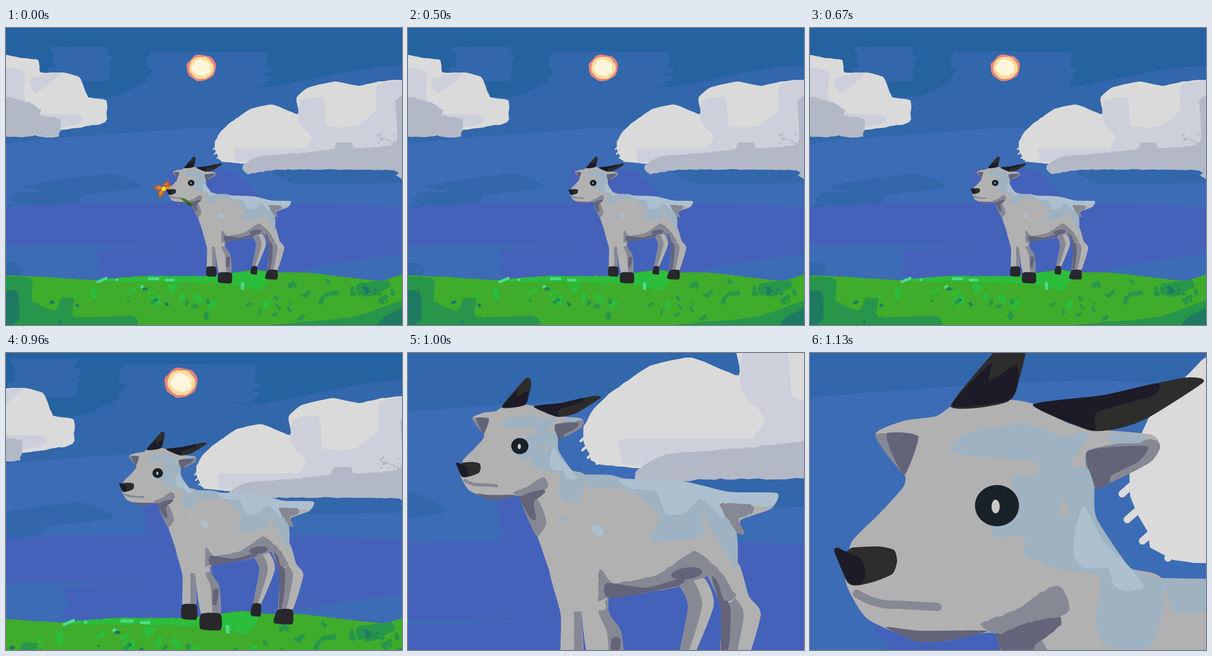
Recreate the animation shown at these times as an HTML page. Size 864 px wide and 648 px high, loop 1710 ms.

```html
<!DOCTYPE html>
<html lang="en">
<head>
<meta charset="utf-8">
<title>Goat</title>
<style>
html, body { margin: 0; width: 100%; height: 100%; overflow: hidden; background: #2562a0; }
svg { display: block; width: 100vw; height: 100vh; }
</style>
</head>
<body>
<svg id="stage" viewBox="0 0 864 648" preserveAspectRatio="none"></svg>
<script>
const NS = 'http://www.w3.org/2000/svg';
const LOOP = 1710;
const C = {
  skyTop: '#2562a0', sky: '#3267ab', skyLow: '#3c6cb5', violet: '#4562ba',
  white: '#dadada', mist: '#cdcfda', cloudShade: '#b3b8c7',
  grass: '#3fac2c', bright: '#2bbd3c', leaf: '#27964a', teal: '#1f7a62', mint: '#4bdb8a',
  coat: '#b1b1b1', shade: '#868893', dark: '#63647a', blue: '#9fb2c1', pale: '#adc0d0',
  black: '#2d2d2c', ink: '#1c1b27', hoof: '#28282c'
};

// Each shot pins the goat's eye and the cloud's left tip to the screen.
const shots = [
  { at: 0, eye: [404, 338], zoom: 1, cloud: [451, 265], depth: 1 },
  { at: 960, eye: [331, 262], zoom: 1.566, cloud: [410, 266], depth: 1.13 },
  { at: 1000, eye: [244, 203], zoom: 2.59, cloud: [374, 193], depth: 1.87 },
  { at: 1040, eye: [330, 337], zoom: 4.02, cloud: [580, 320], depth: 3.46 },
  { at: 1130, eye: [408, 333], zoom: 6.62, cloud: [673, 310], depth: 5.3 }
];
const [wide, near, closer, , face] = shots;
const pin = (from, to, scale) => `translate(${to}) scale(${scale}) translate(${from.map(v => -v)})`;
// Lets a part be drawn in the coordinates of a closer shot.
const drawnIn = shot => pin(shot.eye, wide.eye, 1 / shot.zoom);

let seed = 11;
const random = () => (seed = seed * 16807 % 2147483647) / 2147483647;
const between = (a, b) => a + (b - a) * random();
const jitter = r => between(-r, r);

function add(parent, tag, attrs) {
  const el = document.createElementNS(NS, tag);
  for (const key in attrs) el.setAttribute(key, attrs[key]);
  return parent.appendChild(el);
}
const layer = (parent, transform = '') => add(parent, 'g', { transform });
const points = text => text.split(' ').map(s => s.split(',').map(Number));
const spot = (g, fill, cx, cy, rx, ry, turn = 0) =>
  add(g, 'ellipse', { cx, cy, rx, ry, fill, transform: `rotate(${turn} ${cx} ${cy})` });
const stroke = (g, color, width, d, cap = 'round') =>
  add(g, 'path', { d, stroke: color, 'stroke-width': width, fill: 'none', 'stroke-linecap': cap });

// Closed curve through key points; a rough edge is frayed like dry paint.
function shape(g, fill, keys, rough = 0) {
  const p = typeof keys === 'string' ? points(keys) : keys;
  const at = i => p[(i + p.length) % p.length];
  const edge = [];
  p.forEach((a, i) => {
    const b = at(i + 1), before = at(i - 1), after = at(i + 2);
    const steps = Math.ceil(Math.hypot(b[0] - a[0], b[1] - a[1]) / 9);
    for (let s = 0; s < steps; s++) {
      const t = s / steps, u = 1 - t;
      edge.push(a.map((v, k) => {
        const c1 = v + (b[k] - before[k]) * 0.1;
        const c2 = b[k] - (after[k] - v) * 0.1;
        return u ** 3 * v + 3 * u * u * t * c1 + 3 * u * t * t * c2 + t ** 3 * b[k] + jitter(rough);
      }));
    }
  });
  return add(g, 'path', { d: `M${edge.join('L')}Z`, fill });
}

// Block of horizontal brush strokes with uneven ends.
function wash(g, color, x0, y0, x1, y1, ragged = 16) {
  const height = 9;
  for (let y = y0; y < y1; y += height) {
    const left = x0 + between(0, ragged), right = x1 - between(0, ragged);
    stroke(g, color, height + 3, `M${left} ${y + 5}L${right} ${y + 5 + jitter(1)}`);
  }
}

function disc(g, fill, cx, cy, r, rough) {
  const rim = Array.from({ length: 20 }, (_, i) => {
    const a = i * Math.PI / 10, reach = r + jitter(rough);
    return [cx + reach * Math.cos(a), cy + reach * 0.93 * Math.sin(a)];
  });
  shape(g, fill, rim);
}

function daubs(g, color, count, x0, y0, x1, y1, size) {
  for (let i = 0; i < count; i++) {
    const x = between(x0, x1), y = between(y0, y1);
    stroke(g, color, between(0.5, 1) * size, `M${x} ${y}l${jitter(size)} ${between(0, size)}`);
  }
}

function paintSky(g) {
  add(g, 'rect', { width: 864, height: 648, fill: C.skyTop });
  shape(g, C.sky, '-20,150 225,151 330,112 570,128 884,90 884,420 -20,420');
  wash(g, C.sky, 308, 52, 574, 124);
  wash(g, C.sky, 96, 42, 228, 110);
  shape(g, C.skyLow, '-20,262 200,234 283,228 470,220 560,300 640,341 884,341 884,420 -20,420');
  shape(g, C.sky, '40,345 228,318 294,347 150,364');
  wash(g, C.sky, 0, 360, 160, 392, 30);
  shape(g, C.violet, '-20,394 884,394 884,560 -20,560');
  shape(g, C.skyLow, '-20,474 375,474 200,481 -20,486');
  wash(g, C.skyLow, -20, 476, 205, 545);
  wash(g, C.sky, -20, 513, 32, 540);
  shape(g, C.skyLow, '884,492 640,530 884,550');
  shape(g, C.violet, '353,316 372,309 490,311 550,365 550,396 372,396 360,370', 3);
}

function paintSun(g) {
  disc(g, '#e8837c', 426.5, 87, 31.5, 2);
  disc(g, '#fddc9b', 426.5, 87, 26.5, 1);
  disc(g, '#fff6dc', 426, 87, 20, 3);
}

function paintClouds(g) {
  shape(g, C.white, '-10,66 30,65 70,70 75,97 120,97 160,107 180,150 218,158 220,185 205,210 -10,225', 1);
  shape(g, C.mist, '-10,94 40,96 40,155 80,186 158,189 156,210 -10,225', 1);
  shape(g, C.mist, '52,112 122,97 66,142', 1);
  shape(g, C.cloudShade, '-10,153 48,162 78,180 75,191 118,199 115,236 70,236 -10,232', 2);

  shape(g, C.white, '456,248 468,227 485,210 503,197 533,177 582,167 637,188 634,152 660,130 720,117 770,126 820,116 884,124 884,300 600,300 474,292 463,280 456,265', 0.5);
  for (let i = 0; i < 4; i++) {
    stroke(g, C.white, 3, `M${452.5 + 2.1 * i * i} ${264.5 + 11.5 * i - 0.9 * i * i}l9 -8`);
  }
  wash(g, C.mist, 502, 263, 884, 288, 10);
  shape(g, C.mist, '642,160 692,152 700,212 760,215 806,180 812,124 884,122 884,268 660,268 668,240 640,205', 1.5);
  shape(g, C.cloudShade, '516,301 553,280 640,273 715,263 720,250 755,250 760,262 850,250 850,160 884,152 884,325 850,322 848,310 600,309 528,318', 1);
  daubs(g, C.cloudShade, 14, 810, 230, 848, 252, 4);
}

function paintGround(g) {
  shape(g, C.grass, '-20,547 60,542 200,550 300,541 440,541 540,528 590,533 660,534 815,551 884,538 884,660 -20,660');
  shape(g, C.bright, '200,551 300,542 440,541 540,529 576,540 552,572 500,560 350,554', 2);
  daubs(g, C.bright, 12, 140, 556, 580, 600, 14);
  shape(g, C.leaf, '-20,548 56,548 56,592 106,618 120,589 148,591 150,630 276,628 270,660 -20,660', 2);
  shape(g, C.leaf, '575,650 760,630 884,590 884,660', 1);
  shape(g, C.teal, '-20,578 26,576 28,635 -20,660', 2);
  shape(g, C.teal, '808,655 828,630 884,604 884,655', 1);
  shape(g, C.leaf, '765,560 834,550 838,566 800,584 770,582', 2);
  daubs(g, C.teal, 5, 780, 560, 810, 576, 9);
  daubs(g, C.leaf, 14, 600, 548, 864, 605, 11);
  daubs(g, C.leaf, 16, 270, 575, 680, 632, 9);
  daubs(g, C.teal, 7, 100, 565, 390, 640, 7);
  stroke(g, C.mint, 6, 'M198 555l23-10M239 549h6M310 547h24M347 550h20M294 567l6-5M513 562h7', 'butt');
  stroke(g, C.mint, 7, 'M516 555v16', 'butt');
}

function paintFlower(g) {
  const [x, y] = [343, 351];
  for (const turn of [115, 190, 305, 340]) {
    const petal = layer(g, `translate(${x} ${y}) rotate(${turn})`);
    spot(petal, '#b9592a', 11, 0, 9, 6);
    spot(petal, '#db853a', 10, 1, 6, 3.5);
  }
  spot(g, '#f3d820', 344, 351, 5, 5);
}

function paintStem(g) {
  shape(g, '#4a7a36', '380,372 388,371 410,385 405,390');
  shape(g, '#2f5828', '390,377 407,386 401,389');
}

// A limb is a chain of [x, y, width]; from and to pick a slice of its width.
function limb(g, fill, joints, from = -0.5, to = 0.5) {
  const side = k => joints.map(([x, y, w]) => [x + w * k, y]);
  shape(g, fill, [...side(from), ...side(to).reverse()]);
}

function paintLeg(g, joints, lit, hoofHeight) {
  const [x, y, w] = joints[joints.length - 1];
  limb(g, C.coat, joints);
  if (lit === 'left') limb(g, C.shade, joints, 0.12, 0.5);
  else limb(g, C.shade, joints, -0.5, 0.05);
  const foot = y + hoofHeight, half = w * 0.52;
  const heel = lit === 'left' ? half * 1.1 : half * 1.6;
  shape(g, C.hoof, [[x - half, y - 3], [x + half, y - 3], [x + half * 1.15, foot - 8], [x + half, foot], [x - heel, foot - 3]]);
}

function paintLegs(g) {
  paintLeg(g, points('395,420,50 399,485,28 400,552,29'), 'left', 30);
  paintLeg(g, points('556,436,36 570,472,34 547,550,16'), 'right', 25);
  paintLeg(g, points('420,415,52 430,480,36 440,508,50 447,572,40'), 'left', 33);
  paintLeg(g, points('596,415,44 612,460,42 624,484,50 609,563,30'), 'right', 29);
  limb(g, C.dark, points('588,434,8 602,475,13 602,520,11 598,558,6'));
  limb(g, C.dark, points('458,516,12 455,550,8'));
}

function paintBody(g) {
  shape(g, C.coat, '310,190 340,240 372,264 440,266 480,275 600,280 700,303 806,306 792,340 725,365 733,396 718,390 716,450 728,512 700,545 665,486 580,512 435,536 430,560 340,560 310,480 265,350 245,310');
  shape(g, C.blue, '330,250 372,264 440,266 480,275 600,280 690,312 718,400 714,470 642,350 640,400 530,412 548,355 480,300 385,296 380,325 340,325 325,285');
  shape(g, C.pale, '460,275 600,280 700,303 806,306 790,335 690,329 688,362 640,318 602,350 562,350 540,302 485,296');
  spot(g, C.blue, 338, 349, 20, 18);
  spot(g, C.pale, 414, 388, 14, 11, 30);
  shape(g, C.shade, '682,330 750,331 750,350 722,362 733,396 712,386', 2);
  shape(g, C.shade, '418,472 450,502 548,482 625,432 680,475 715,530 690,540 665,486 580,512 435,536 415,540', 1.5);
  shape(g, C.dark, '433,502 520,512 600,490 590,508 440,535');
  spot(g, C.dark, 608, 481, 34, 13, -8);
}

function paintHead(g) {
  shape(g, C.coat, '142,178 205,148 275,138 310,116 380,103 450,103 500,115 560,152 620,166 745,178 764,205 740,240 618,298 625,360 650,415 700,470 770,497 800,720 460,720 405,612 300,628 235,628 125,580 78,500 90,414 150,352 203,293 205,262');
  shape(g, C.shade, '142,178 240,182 222,192 206,265');
  shape(g, C.dark, '168,175 236,182 207,265 180,222');
  shape(g, C.shade, '605,214 744,188 764,205 740,240 622,294');
  shape(g, C.dark, '605,214 735,203 718,236 658,267 652,286 622,294');
  shape(g, C.blue, '304,208 340,175 400,164 470,154 545,180 612,174 568,244 605,250 620,292 625,360 700,470 770,497 768,565 740,645 650,640 622,592 632,490 540,472 465,438 470,400 405,404 396,376 456,350 440,268 490,270 492,236 340,225');
  shape(g, C.coat, '555,318 566,356 541,354');
  shape(g, C.pale, '598,335 578,390 576,445 600,470 650,470 662,506 690,520 728,510 700,470 640,410');
  shape(g, C.blue, '657,175 728,178 722,196 656,196');
  stroke(g, C.shade, 18, 'M102 525Q145 552 190 549L278 554');
  shape(g, C.dark, '165,598 240,606 388,606 300,628 235,630');
  shape(g, C.shade, '405,612 490,610 532,676 556,766 499,832');
  shape(g, C.dark, '405,612 490,625 485,660 499,741 465,735');
  shape(g, C.shade, '372,592 450,560 520,512 550,514 562,566 440,620', 2);
  shape(g, C.dark, '408,620 490,584 546,577 540,602 440,665', 2);
  spot(g, '#192229', 408, 333, 48, 45);
  spot(g, '#cbc9c4', 405, 335, 9, 15);
  shape(g, C.black, '307,116 433,-37 454,-47 468,-41 469,8 433,105');
  shape(g, C.ink, '310,115 395,22 390,62 450,25 454,66 433,104');
  shape(g, C.black, '486,113 640,92 815,54 859,63 740,140 680,163 610,169');
  shape(g, C.ink, '486,113 640,92 758,66 750,92 625,130 618,169');
}

function paintNose(g) {
  shape(g, C.black, '52,430 64,425 78,436 90,425 150,422 184,430 190,455 180,482 140,499 105,507 82,501');
  shape(g, C.ink, '53,431 65,428 110,448 122,480 110,504 84,500');
}

const stage = document.getElementById('stage');
const world = layer(stage);
const goat = layer(stage);
[paintSky, paintSun, paintClouds, paintGround].forEach(paint => paint(world));
const flower = layer(goat);
paintFlower(flower);
paintLegs(layer(goat, drawnIn(near)));
paintBody(layer(goat, drawnIn(closer)));
paintHead(layer(goat, drawnIn(face)));
const nose = layer(goat);
paintNose(layer(nose, drawnIn(face)));
const stem = layer(goat);
paintStem(stem);

const move = (el, transform) => el.setAttribute('transform', transform);

function draw(t) {
  const shot = shots.filter(s => s.at <= t).pop();
  move(world, pin(wide.cloud, shot.cloud, shot.depth));
  move(goat, pin(wide.eye, shot.eye, shot.zoom));

  // Six bites: the flower tips up and slides in behind the muzzle.
  const bite = t < 80 ? 0 : Math.min(6, 1 + Math.floor((t - 80) / 84));
  const pull = Math.max(0, bite - 1) * 8;
  const tip = bite % 2 * 10;
  const mouth = [381, 372];
  move(flower, `translate(${pull} ${pull * 0.3}) rotate(${tip} 372 372)`);
  move(stem, `${pin(mouth, mouth, 1 - bite / 6)} rotate(${-tip} ${mouth})`);
  flower.style.display = stem.style.display = bite < 6 ? '' : 'none';

  // A short sniff in two steps.
  const lift = t >= 670 && t < 790 ? Math.floor((t - 670) / 60) - 2 : 0;
  move(nose, `translate(0 ${lift})`);
}

const start = performance.now();
function tick() {
  draw((performance.now() - start) % LOOP);
  requestAnimationFrame(tick);
}
tick();
</script>
</body>
</html>
```
